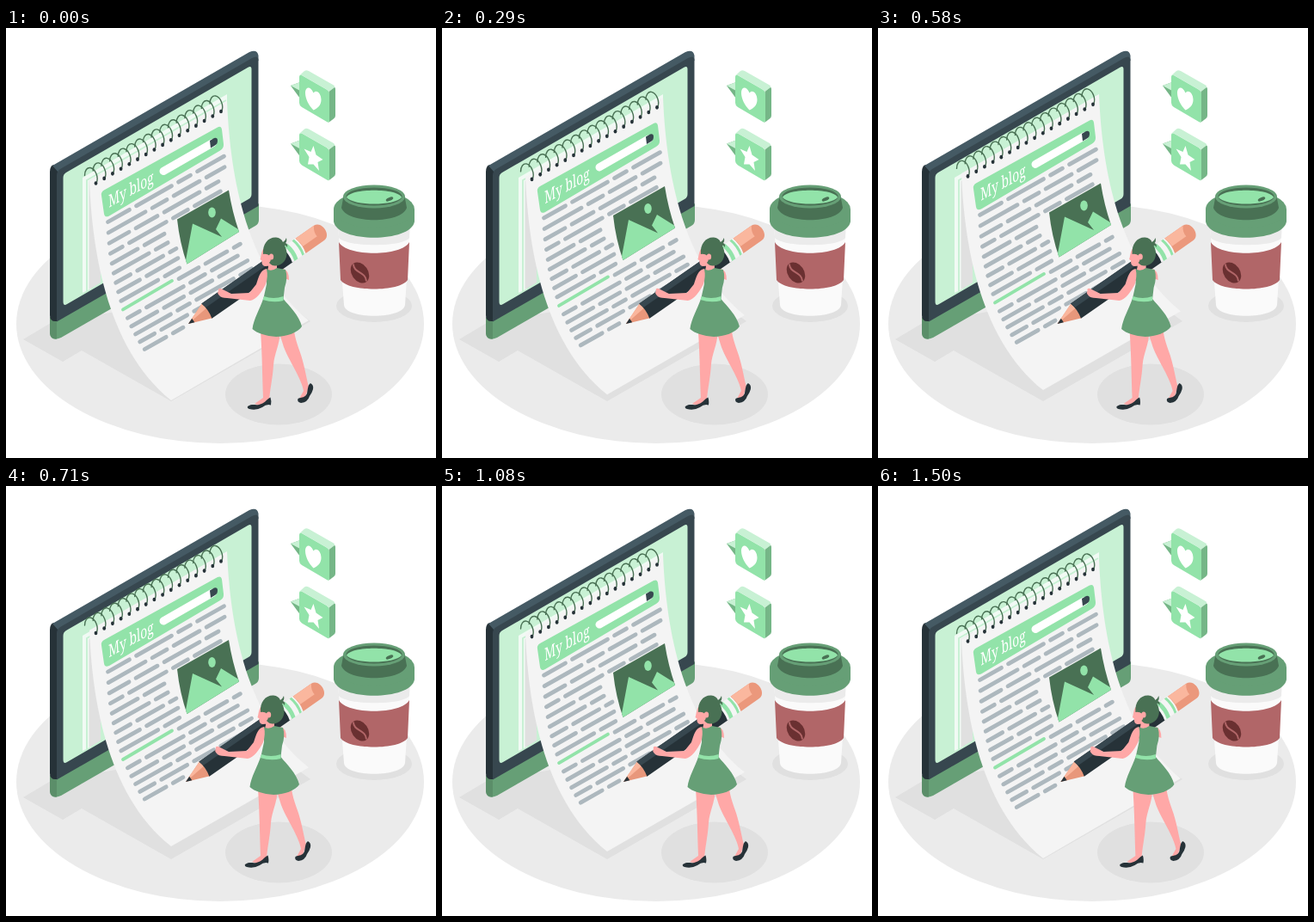
These frames come from a looping animation (500 by 500 pixels, 1.54 s). An HTML page:

```html
<!DOCTYPE html>
<html lang="en">
<head>
<meta charset="utf-8">
<title>My blog</title>
<style>
  @property --lift { syntax: '<number>'; inherits: true; initial-value: 0; }
  @property --sway { syntax: '<number>'; inherits: true; initial-value: 0; }

  html, body { margin: 0; width: 100%; height: 100%; overflow: hidden; background: #fff; }
  svg {
    display: block; width: 100vw; height: 100vh;
    animation: lift 1540ms linear infinite, sway 1540ms ease-in-out infinite;
  }
  #sheet { transform: translateY(calc(var(--lift) * -7.8px)) scaleY(calc(1 - var(--lift) * .0144)); }
  #content, #rings { transform: translateY(calc(var(--lift) * -9.5px)); }
  #writer { transform: translateX(calc(var(--sway) * 1px)); }

  @keyframes lift {
    0%, 97.4%, 100% { --lift: 0; }
    18.8% { --lift: .48; }
    29.9% { --lift: .71; }
    46.1% { --lift: 1; }
    49% { --lift: 1; }
    70.1% { --lift: .57; }
    86.4% { --lift: .2; }
  }
  @keyframes sway {
    0%, 100% { --sway: 0; }
    17% { --sway: 2; }
    18.8% { --sway: 1.9; }
    29.9% { --sway: -2; }
    37% { --sway: -3.4; }
    46.1% { --sway: -3; }
    58% { --sway: 3.8; }
    70.1% { --sway: -1; }
    79% { --sway: 1.8; }
    86.4% { --sway: -.5; }
    97.4% { --sway: .4; }
  }

  .main { fill: #92e3a9; }
  .pale { fill: #c8f1d4; }
  .mid { fill: #669f76; }
  .deep { fill: #497154; }
  .soft { fill: #75b687; }
  .skin { fill: #ffa8a7; }
  .ink { fill: #263238; }
  .slate { fill: #37474f; }
  .shade { fill: #e0e0e0; }
  .white { fill: #fff; }
  #lines { fill: none; stroke: #adb8be; stroke-width: 4.8; stroke-linecap: round; }
  #rings path { fill: none; stroke: #497154; stroke-width: 1.4; stroke-linecap: round; }
  .title { font: 20px "Noto Serif", serif; fill: #fff; }
</style>
</head>
<body>
<svg viewBox="0 0 500 500">
  <defs>
    <g id="bubble">
      <path class="soft" d="M331 67L342 63V82Z"/>
      <path class="pale" d="M331 67L342 63V73Z"/>
      <path class="main" d="M341 57Q341 54 344 55L372 71Q376 73 376 77V107Q376 111 373 109L344 92Q341 90 341 87Z"/>
      <path class="pale" d="M341.500 55L347 50Q349 48.500 352 50L381 66.500Q383 68 382 69L375.500 74Q374 72 372 71L344 55Z"/>
      <path class="soft" d="M375.500 74L382 69Q383 69 383 71V102Q383 104 381 105.500L375 110Q376 109 376 107V77Z"/>
    </g>
  </defs>

  <ellipse cx="249" cy="344" rx="237" ry="139" fill="#ebebeb"/>
  <path class="shade" d="M20 362L66 388L88 375L192 434L354 341L300 300L52 343Z"/>
  <ellipse class="shade" cx="317" cy="426" rx="62" ry="35.500"/>

  <g id="monitor">
    <path class="mid" d="M51 338H59L294 204V223Q294 228 290 230L64 360Q52 365 51 355Z"/>
    <path fill="#5b8e69" d="M51 336L59 341V361.500Q52 362 51 355Z"/>
    <path class="ink" d="M51 167Q51 161 55 159L61 166L59 341Q51 342 51 334Z"/>
    <path fill="#455a64" d="M54 160L283 28Q292 24 293.500 32V38L61 168Z"/>
    <path class="slate" d="M59 171Q59 167 63 164L286 35Q293 31 293.500 37V207L59 341.500Z"/>
    <path class="pale" d="M66.500 174Q66.500 170 70 168L281 46Q285.500 43 285.500 48V193Q285.500 197 282 199L71 321Q66.500 324 66.500 318Z"/>
    <path fill="#f1faf4" d="M89 174L257 77V110L99 200V303L89 308Z"/>
    <path class="shade" d="M96.500 178L110 170V296L96.500 304Z"/>
    <path d="M94 306V177L256 84" fill="none" stroke="#c8f1d4" stroke-width="2"/>
  </g>

  <path id="sheet" fill="#f4f4f4" d="M97 178C100 250 114 370 192 433L352 340C274 277 260 157 257 85Z"/>

  <g id="content">
    <path class="main" d="M111 195Q110 191 114 188.500L246 115.500Q250 113.500 251 118L253 135Q253.500 140 249 142.500L120 218.500Q115 221 114 216Z"/>
    <path d="M183 166.500L240.500 133.500" stroke="#fff" stroke-width="9" stroke-linecap="round"/>
    <path class="slate" d="M237 131L242 128Q246 127 246 131Q246 135 243 136.500L238 139.500Z"/>
    <text class="title" transform="matrix(.69 -.38 .05 1 119.500 209)">My blog</text>
    <g id="lines"></g>
    <path d="M136 327.500L193 294" stroke="#92e3a9" stroke-width="3.800" stroke-linecap="round"/>
    <path class="deep" d="M199 222.500L259 188.500Q263 214 271 237L210.500 274.500Q202 250 199 222.500Z"/>
    <path class="main" d="M210.500 274.500L209 270L217 227.500L251 243L244 234L250 221.500L270 234L271 237Z"/>
    <ellipse class="main" cx="239.500" cy="214.500" rx="4.300" ry="6"/>
  </g>
  <g id="rings"></g>

  <use href="#bubble"/>
  <path class="white" d="M357.500 95.500C352 90 348 82 348 75.500C348 68 354 67 357.500 75.500C361 71 366.500 76 366.500 83.500C366.500 90 362 93.500 357.500 95.500Z"/>
  <use href="#bubble" y="67.500"/>
  <path class="white" d="M357.500 137L360.500 147.500L368.500 153L362.500 156L364 166L357.500 158.500L351 158.500L352.500 150L346.500 140.500L354.500 144Z"/>

  <g id="cup">
    <ellipse class="shade" cx="428" cy="323" rx="44" ry="19"/>
    <path fill="#fafafa" d="M386.500 236L393 322C394 339 462 339 464 322L469.500 236Z"/>
    <path fill="#ebebeb" d="M386.500 234H469.500L469 244C462 255 396 255 387 244Z"/>
    <path fill="#b16668" d="M387 249C396 266 460 266 469 249L467 293C458 307 398 307 389 293Z"/>
    <g transform="rotate(-35 411.500 284.500)">
      <ellipse cx="411.500" cy="284.500" rx="9.500" ry="13" fill="#6a3031"/>
      <path d="M411 272C405 281 418 287 412 297" fill="none" stroke="#b16668" stroke-width="2"/>
    </g>
    <path class="mid" d="M381 211V225C385 250 471 250 475 225V211Z"/>
    <ellipse class="mid" cx="428" cy="211" rx="47" ry="22"/>
    <path class="deep" d="M390 209L393 193H463L466 209C460 228 396 228 390 209Z"/>
    <ellipse class="mid" cx="428" cy="196" rx="36" ry="13.500"/>
    <ellipse class="deep" cx="428" cy="196" rx="32.500" ry="10.500"/>
    <path class="main" d="M396 197C400 186 456 186 460 197C452 207 404 207 396 197Z"/>
    <ellipse class="deep" cx="446" cy="199" rx="4.500" ry="2" transform="rotate(-22 446 199)"/>
  </g>

  <g id="writer">
    <g transform="translate(212 344) rotate(-34.800)">
      <path fill="#e8977b" d="M0 0L27 -10.500Q29 0 27 10.500Z"/>
      <path fill="#fab69d" d="M0 0L27 -10.500L28 -3Z"/>
      <path class="ink" d="M0 0L7 -2.700V2.700Z"/>
      <path class="ink" d="M26 -10.500H142V10.500H26Q29 0 26 -10.500Z"/>
      <path class="slate" d="M26 -10.500H142V-4H28Z"/>
      <path fill="#f5f5f5" d="M140 -10.500H160Q163 0 160 10.500H140Q143 0 140 -10.500Z"/>
      <path class="main" d="M143 -10.500H148Q151 0 148 10.500H143Q146 0 143 -10.500ZM154 -10.500H157Q160 0 157 10.500H154Q157 0 154 -10.500Z"/>
      <path fill="#eb987c" d="M159 -10.500H185C196 -10.500 196 10.500 185 10.500H159Q162 0 159 -10.500Z"/>
      <path fill="#fab79e" d="M159 -10.500H185Q180 -4 181 2H161Q161 -5 159 -10.500Z"/>
    </g>

    <path class="skin" d="M317 352H335C337 367 343 377 346 391C349 403 350 410 352 417L348 429L341 431L346 422C344 408 329 387 323 371Z"/>
    <path class="skin" d="M296 352H319C318 370 312 378 311 392C310 408 307 419 306 434L297 439L289 437L299 430C298 405 298 382 296 352Z"/>
    <path class="ink" d="M281 440C287 436 291 440 297 437C302 435 304 431 307.500 429.500Q309 434 308 438.500Q303 437 298 441Q291 445 283 443Q280 442 281 440Z"/>
    <path class="ink" d="M339.500 431C344 429 348 430 350 425C351 420 351 415 354 413Q358 415 357 420Q356 424 353 428Q351 435 343 436Q338 435 339.500 431Z"/>

    <path class="skin" d="M322 280Q329 281 329 293L321 290Z"/>
    <path class="skin" d="M305 270H315V284H303Q306 279 305 270Z"/>
    <path class="mid" d="M303 280Q308 284 315 279L325 281Q328 290 324 302L322.500 315C329 323 341 334 344 347C340 354 326 359 314 359C302 358 292 355 286.500 350C288 338 295 327 299.500 314L303 298Z"/>
    <path class="main" d="M300 312Q311 316 322.500 312V317Q311 320 298.500 316Z"/>
    <path class="skin" d="M303 280C296 281 294 289 291 298L283 308L262 309L250 303Q246 302 247 306Q245 308 248 311Q250 314 257 314L284 317C291 316 298 306 302 298Q305 289 303 280Z"/>
    <path class="skin" d="M299 257C296 263 297 265 295.500 269L297.500 270.500Q297 276 301 277Q309 277 312 271V257Z"/>
    <path class="deep" d="M299 263C298 251 305 243 314 243.500Q320 244 322 249Q325 247 326 244Q327 248 325 250Q328 251 327 255Q325 252 324 253C329 262 326 272 319 275Q311 279 306 273Q309 270 307 265Q303 262 299 263Z"/>
    <ellipse class="skin" cx="308.500" cy="266" rx="2.700" ry="3.500"/>
  </g>
</svg>
<script>
  const NS = 'http://www.w3.org/2000/svg';
  const byId = id => document.getElementById(id);
  const add = (parent, tag, attrs) => {
    const el = document.createElementNS(NS, tag);
    for (const key in attrs) el.setAttribute(key, attrs[key]);
    parent.append(el);
  };

  // Sixteen coils along the top edge of the sheet
  for (let i = 0; i < 16; i++) {
    const x = 104.5 + i * 9.7, y = 180.5 - i * 5.57;
    const at = { transform: `translate(${x} ${y})` };
    add(byId('rings'), 'path', { ...at, d: 'M-13 -9C-13 -15 -10 -18.5 -6.5 -18C-1 -17 4 -7 .5 0' });
    add(byId('rings'), 'ellipse', { ...at, rx: 1.9, ry: 2.3, class: 'ink' });
  }

  // Text rows, cut short beside the picture and next to the pencil tip
  const SLOPE = -.565, GAP = 8;
  const lengths = [25, 41, 14, 43, 17, 30, 23];
  let d = '';
  for (let row = 0; row < 15; row++) {
    const x0 = 118.5 + .39 * row + .19 * row * row;
    const y0 = 225.5 + 12.7 * row - .152 * row * row;
    let end = x0 + 135, x = row === 9 ? 201 : x0;
    if (row > 3 && row < 9) end = 194 + (row - 4) * 2;
    if (row === 14) end = 206;
    for (let k = row * 3; x < end - 3; k++) {
      const stop = Math.min(x + lengths[k % lengths.length], end);
      d += `M${x} ${y0 + (x - x0) * SLOPE}L${stop} ${y0 + (stop - x0) * SLOPE}`;
      x = stop + GAP;
    }
  }
  add(byId('lines'), 'path', { d });
</script>
</body>
</html>
```
